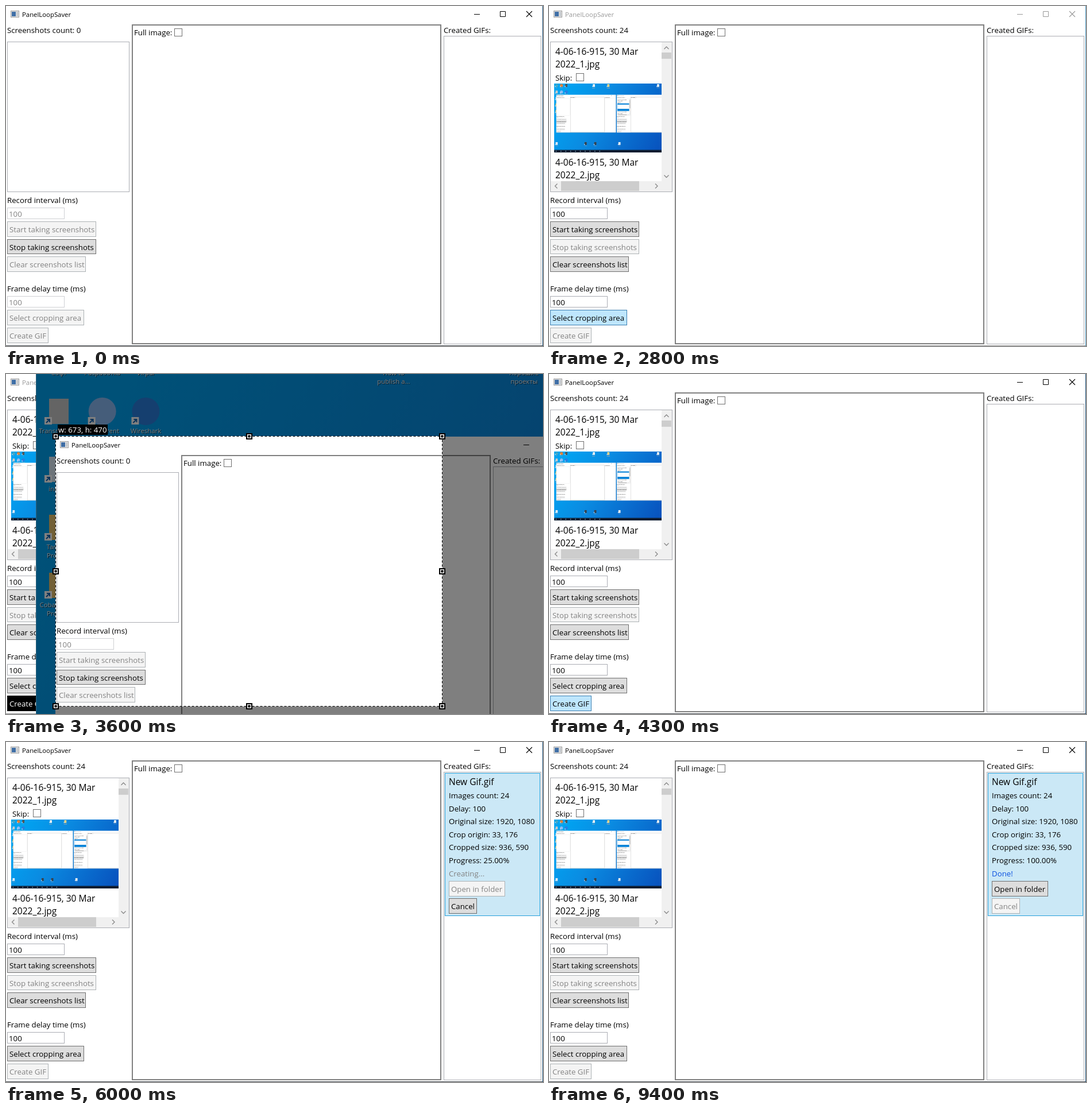
These frames come from a looping animation (935 px wide and 592 px high, 9.9 s). An HTML page:

```html
<!DOCTYPE html>
<html lang="en">
<head>
<meta charset="utf-8">
<title>Screen recorder demo</title>
<style>
html, body { margin: 0; width: 100%; height: 100%; overflow: hidden; background: #fff; }
svg { display: block; }
text { font-family: "Open Sans", "Noto Sans", sans-serif; white-space: pre; }
</style>
</head>
<body>
<svg id="stage" width="935" height="592" viewBox="0 0 935 592">
  <defs id="defs"></defs>
  <g id="view"></g>
</svg>
<script>
const LOOP = 9900, APP = 'PanelLoopSaver', UI = 13.25, BIG = 15.5, SMALL = 11.35;

// Filled box; a stroke is kept inside the given size.
function box(x, y, w, h, fill, stroke, sw = 1) {
  return stroke
    ? `<rect x="${x + sw / 2}" y="${y + sw / 2}" width="${w - sw}" height="${h - sw}" fill="${fill}" stroke="${stroke}" stroke-width="${sw}"/>`
    : `<rect x="${x}" y="${y}" width="${w}" height="${h}" fill="${fill}"/>`;
}
const text = (x, y, s, size = UI, fill = '#000', anchor = 'start') =>
  `<text x="${x}" y="${y}" font-size="${size}" fill="${fill}" text-anchor="${anchor}">${s}</text>`;
const line = (d, color, w = 1) => `<path d="${d}" fill="none" stroke="${color}" stroke-width="${w}"/>`;
const shape = (d, color) => `<path d="${d}" fill="${color}"/>`;
const circle = (x, y, r, color) => `<circle cx="${x}" cy="${y}" r="${r}" fill="${color}"/>`;
const at = (x, y, body, scale = 1) => `<g transform="translate(${x} ${y}) scale(${scale})">${body}</g>`;
const crop = (x, y, w, h, body) =>
  `<svg x="${x}" y="${y}" width="${w}" height="${h}" viewBox="${x} ${y} ${w} ${h}">${body}</svg>`;
function chevron(x, y, dir, color, r = 4, w = 1.3) {
  const turn = { up: 0, right: 90, down: 180, left: 270 }[dir];
  return `<path transform="translate(${x} ${y}) rotate(${turn})" d="M${-r} ${r / 2}L0 ${-r / 2}L${r} ${r / 2}" fill="none" stroke="${color}" stroke-width="${w}"/>`;
}

// ---- recorder window ----
const BUTTON = {
  on: ['#ddd', '#707070', '#000'],
  off: ['#f4f4f4', '#adb2b5', '#838383'],
  hover: ['#bee6fd', '#3c7fb1', '#000'],
  dark: ['#000', '#000', '#fff']
};
function button(x, y, w, label, state, h = 27) {
  const [fill, stroke, ink] = BUTTON[state];
  return box(x, y, w, h, fill, stroke) + text(x + 4, y + 19, label, UI, ink);
}
const input = (y, on) =>
  box(2, y, 100, 20, '#fff', on ? '#abadb3' : '#cfd0d3') + text(5, y + 16, '100', UI, on ? '#000' : '#838383');
const checkbox = (x, y) => box(x, y, 14, 14, '#fff', '#707070');

function shotItem(y, n, thumb) {
  return text(11, y + 22, '4-06-16-915, 30 Mar', BIG) + text(11, y + 44, `2022_${n}.jpg`, BIG) +
    text(11, y + 67, 'Skip:') + checkbox(47, y + 54) + at(9, y + 72, thumb, 1 / 9);
}

function shotList(count, thumb) {
  let out = box(2, 62, 213, 262, '#fff', '#abadb3');
  if (!count) return out;
  const tall = count > 1, right = tall ? 196 : 214;
  let items = shotItem(63, 1, thumb);
  if (tall) items += shotItem(256, 2, '');
  out += crop(3, 63, right - 3, 242, items) + box(3, 305, 211, 18, '#f0f0f0') +
    box(21, 305, tall ? 136 : 160, 17, '#cdcdcd') +
    chevron(12.5, 313.5, 'left', '#888') + chevron(right - 9, 313.5, 'right', '#888');
  if (tall) {
    out += box(196, 63, 18, 242, '#f0f0f0') + box(196, 81, 17, 208 * 242 / (193 * count), '#cdcdcd') +
      chevron(204.5, 73, 'up', '#888') + chevron(204.5, 296.5, 'down', '#888');
  }
  return out;
}

function gifItem(n) {
  const done = n === 24;
  const rows = ['Images count: 24', 'Delay: 100', 'Original size: 1920, 1080', 'Crop origin: 33, 176',
    'Cropped size: 936, 590', `Progress: ${(n / 24 * 100).toFixed(2)}%`];
  return box(764, 54, 166, 249, '#cbe8f6', '#26a0da') + text(771, 75, 'New Gif.gif', BIG) +
    rows.map((s, i) => text(771, Math.round(98 + i * 22.6), s)).join('') +
    text(771, 234, done ? 'Done!' : 'Creating...', UI, done ? '#0a50e0' : '#838383') +
    button(771, 242, 98, 'Open in folder', done ? 'on' : 'off') +
    button(771, 272, 49, 'Cancel', done ? 'off' : 'on');
}

function appIcon() {
  return box(8, 8, 15, 12, '#e8e8e8', '#9a9a9a') + box(10, 10, 7, 8, '#3f6ea5') + box(18, 10, 3, 8, '#c4c8cc');
}

function app(s) {
  const ink = s.active ? '#000' : '#999';
  const idle = s.live ? 'off' : 'on';
  const state = (name, base) => s.hover === name ? 'hover' : base;
  return box(0, 0, 935, 592, '#fff') + appIcon() + text(28, 19, APP, SMALL, ink) +
    line('M815 14.5h10M860.5 9.5h9v9h-9z', ink) + line('M906 9l10 10M916 9l-10 10', ink, 1.1) +
    text(2, 47, `Screenshots count: ${s.count}`) + shotList(s.count, s.thumb) +
    text(2, 343, 'Record interval (ms)') + input(351, !s.live) +
    button(2, 375, 155, 'Start taking screenshots', idle) +
    button(2, 406, 155, 'Stop taking screenshots', s.live ? state('stop', 'on') : 'off', 26) +
    button(2, 436, 137, 'Clear screenshots list', idle) +
    text(2, 497, 'Frame delay time (ms)') + input(505, !s.live) +
    button(2, 529, 134, 'Select cropping area', state('select', idle)) +
    button(2, 560, 72, 'Create GIF', s.create || 'off') +
    box(219, 32, 539, 557, '#fff', '#808080', 2) + text(223, 51, 'Full image:') + checkbox(293, 39) +
    text(762, 47, 'Created GIFs:') + box(762, 52, 170, 537, '#fff', '#abadb3') +
    (s.gif ? gifItem(s.gif) : '') +
    box(0, 591, 935, 1, s.active ? '#3a3f45' : '#8c8c8c') + box(934, 0, 1, 592, s.active ? '#1b4f78' : '#4f9bc4');
}

// ---- desktop, 1920 by 1080 ----
function deskIcon(col, row, label, color, round) {
  const x = 39 + col * 75.7, y = 31 + row * 101;
  const name = (s, i, dx, ink) => text(x + dx, y + 38 + dx + i * 15, s, SMALL, ink, 'middle');
  return (round ? circle(x, y, 24, color) : box(x - 17, y - 22, 34, 44, color)) +
    box(x - 25, y + 10, 13, 13, '#fff') + line(`M${x - 22} ${y + 20}l6 -6m-5 0h5v5`, '#1464b4', 2) +
    label.split('|').map((s, i) => name(s, i, 1, '#02304f') + name(s, i, 0, '#fff')).join('');
}
function desktop() {
  const icons = [
    [0, 0, 'Софт', '#3fa7c8', 1], [1, 0, 'Разработка', '#e0813a', 1], [2, 0, 'Игры', '#555'],
    [7.7, 0, 'How to|publish a...', '#e9eef2'], [10.7, 0, 'Хорошие|проекты', '#f2d487'],
    [21, 0, 'Заметки', '#e9eef2'],
    [0, 1, 'Transmission', '#c9c9c9'], [1, 1, 'qBittorrent', '#8cbcf5', 1], [2, 1, 'Wireshark', '#2a7fe0', 1],
    [0, 2, 'inkdab', '#dce9f5'], [0, 3, 'Tarnbox|Projects', '#e6c26c'], [0, 4, 'Cobalt Forge|Projects', '#e6c26c'],
    [0, 9, 'Корзина', '#dce9f5'], [6, 9, 'Архив', '#36424f'], [8, 9, 'Снимки', '#36424f'], [13, 9, 'Текст', '#e9eef2']
  ];
  const small = box(0, 0, 1920, 1080, '#0a84d8') + box(33, 176, 1884, 590, '#fff');
  let bar = box(0, 1040, 1920, 40, '#0c1c30');
  for (let i = 0; i < 10; i++) bar += circle(30 + i * 76, 1060, 8, '#8fa4b8');
  return box(0, 0, 1920, 1080, 'url(#sky)') + icons.map(i => deskIcon(...i)).join('') + bar +
    at(33, 176, app({ count: 0, live: true, active: true })) +
    at(981, 176, app({ count: 2, live: true, thumb: small }));
}

// ---- crop overlay ----
function overlay(w, h) {
  const x = 86, y = 108;
  let out = at(53, -67, '<use href="#desk"/>');
  const hole = w ? `M${x + .5} ${y + .5}h${w}v${h}h${-w}z` : '';
  out += `<path d="M53 0H935V592H53z${hole}" fill="#000" fill-opacity=".5" fill-rule="evenodd"/>`;
  if (w) {
    out += line(hole, '#fff') + `<path d="${hole}" fill="none" stroke="#000" stroke-dasharray="4 3"/>` +
      box(90, 88, 87, 18, '#000') + text(91, 102, `w: ${w}, h: ${h}`, UI, '#fff');
    for (const i of [0, .5, 1]) for (const j of [0, .5, 1]) {
      if (i === .5 && j === .5) continue;
      const hx = Math.round(x + w * i), hy = Math.round(y + h * j);
      out += box(hx - 5, hy - 5, 11, 11, '#000') + box(hx - 3, hy - 3, 7, 7, '#000', '#fff', 1.4);
    }
  }
  return crop(53, 0, 882, 592, out) + box(52, 0, 1, 592, '#35647c');
}

// ---- save dialog ----
const FILES = [
  ['ASPdotNETCore Roadmap', '19.01.2022 2:58'], ['ambervale', '29.03.2022 2:15'],
  ['SharedFolder', '14.09.2021 16:01'], ['VMShared', '31.01.2022 10:48'],
  ['Игры', '22.03.2022 17:57'], ['Разработка', '24.03.2022 1:58'], ['Софт', '02.02.2022 12:05'],
  ['типа диплом', '27.12.2021 20:42'], ['Фракталы (соединить в 1 приложение)', '23.03.2022 17:55'],
  ['Хорошие проекты', '27.03.2022 20:27'], ['New 2Gif.gif', '30.03.2022 2:43', 'Файл "GIF"', '5 362 КБ'],
  ['_My Programs', '10.02.2022 15:53', 'Ярлык', '1 КБ'], ['Tarnbox Projects', '21.03.2022 17:22', 'Ярлык', '2 КБ'],
  ['Cobalt Forge Projects', '18.06.2021 18:29', 'Ярлык', '2 КБ']
];
const PLACES = ['Изображени', 'Этот компьютер', 'Видео', 'Документы', 'Загрузки', 'Изображения', 'Музыка',
  'Рабочий стол', 'Локальный дис', 'Data_2 (D:)', 'Data (E:)', 'Локальный дис', ''];

function fileIcon(i, y) {
  if (i === 4) return `<rect x="187" y="${y - 5}" width="14" height="8" rx="4" fill="#777"/>` + circle(191, y - 1, 1.5, '#222') + circle(197, y - 1, 1.5, '#222');
  if (i === 5) return circle(194, y, 7.5, '#e07a25') + circle(194, y, 3.5, '#fff');
  if (i === 6) return circle(194, y, 7.5, '#4fa9c2') + circle(194, y, 4.5, '#e4f3f7');
  if (i === 10) return box(188, y - 8, 12, 15, '#fff') + box(190, y - 3, 8, 6, '#2f78c4');
  return box(188, y - 8, 12, 15, '#f6d675') + box(196, y - 7, 5, 14, '#ffe79c') +
    (i > 10 ? box(186, y, 8, 8, '#fff') + line(`M188 ${y + 6}l4 -4m-3 0h3v3`, '#1464b4') : '');
}

function placeIcon(i, y) {
  if (i === 1 || i === 7) return box(i === 1 ? 32 : 40, y - 6, 16, 11, '#2797ee') + (i === 1 ? box(36, y + 6, 8, 2, '#9fd4f7') : '');
  if (i === 0 || i === 5) return box(40, y - 5, 16, 11, '#3c9ade', '#eee') + shape(`M42 ${y + 4}l4 -5l3 3l2 -2l3 4z`, '#e8f4ea');
  if (i === 2) return box(41, y - 7, 13, 14, '#6f7780') + box(44, y - 5, 7, 10, '#3187c9') + line(`M42.5 ${y - 6}v12M52.5 ${y - 6}v12`, '#111');
  if (i === 3) return box(42, y - 7, 12, 14, '#fff') + line(`M44 ${y - 3.5}h8m-8 3h8m-8 3h8`, '#3b82b8');
  if (i === 4) return shape(`M45 ${y - 7}h6v6h4l-7 8l-7 -8h4z`, '#2d98f0');
  if (i === 6) return circle(45, y + 4, 3, '#3aa0f0') + line(`M47.5 ${y + 4}v-11q1 4 5 6`, '#3aa0f0', 1.8);
  if (i === 12) return circle(42, y + 4, 6, '#5db0e0');
  return `<rect x="41" y="${y}" width="14" height="6" rx="1" fill="#d2d5d8"/>` + box(43, y + 3, 3, 1, '#444') +
    (i === 8 ? box(40, y - 5, 5, 4, '#2797ee') : '');
}

function dialog(filled) {
  const label = (x, y, s, size = SMALL, c = '#fff', a) => text(x, y + 4, s, size, c, a);
  let out = box(7, 29, 930, 534, '#4a4a4a') + box(8, 30, 927, 532, '#202020') + box(8, 30, 927, 31, '#000') +
    label(16, 46, 'Сохранение') + line('M932 41l7 8M932 49l7 -8', '#fff') + box(8, 61, 927, 42, '#191919');
  // address row
  out += line('M33 81.5H22m5 -5l-5 5l5 5M51 81.5h11m-5 -5l5 5l-5 5', '#aaa', 1.4) + chevron(80, 81, 'down', '#aaa', 3) +
    line('M101 88V76m-5 5l5 -5l5 5', '#fff', 1.7) + box(114, 66, 612, 30, '#191919', '#535353') +
    line('M692.5 67v28', '#2b2b2b') + box(117, 74, 16, 11, '#2797ee') +
    chevron(143, 81, 'right', '#aaa', 3) + label(153, 81, 'Этот компьютер') + chevron(256, 81, 'right', '#aaa', 3) +
    label(267, 81, 'Рабочий стол') + chevron(354, 81, 'right', '#aaa', 3) + chevron(677, 82, 'down', '#aaa', 4) +
    line('M706.5 78.5a4.5 4.5 0 1 0 6 -.5M709 76h4.5v4.5', '#aaa', 1.3) + box(738, 66, 210, 30, '#191919', '#535353') +
    label(747, 81, 'Поиск: Рабочий стол', SMALL, '#8c8c8c') + line('M924 83l-4 4', '#bbb', 1.5) +
    '<circle cx="926.5" cy="80" r="4" fill="none" stroke="#bbb" stroke-width="1.3"/>';
  // command row
  out += label(26, 118, 'Упорядочить') + shape('M103 116h8l-4 4z', '#ccc') + label(142, 118, 'Новая папка') +
    box(859, 112, 4, 12, '#bbb') + line('M865 113.5h9m-9 4h9m-9 4h9', '#aaa', 1.4) + shape('M883 116h8l-4 4z', '#ccc') +
    circle(929, 118, 7, '#1f7fd0') + text(929, 122, '?', 11, '#fff', 'middle');
  // places
  let places = box(8, 133, 157, 312, '#191919') + box(8, 311, 138, 22, '#333');
  PLACES.forEach((s, i) => {
    const y = i ? 154 + i * 24 : 146;
    places += placeIcon(i, y) + label(i === 1 ? 52 : 61, y, s);
  });
  places += box(148, 218, 15, 190, '#4d4d4d') + chevron(155.5, 143.5, 'up', '#888', 3.5) + chevron(155.5, 437, 'down', '#888', 3.5) +
    line('M136 151l3 -3m-2 -3l4 4m-2 -5l4 4m-5 -1l3 -3', '#999', 1.5);
  // files
  let files = line('M439.5 134v25M583.5 134v25M703.5 134v25M783.5 134v25', '#5a5a5a') + chevron(643, 136.5, 'up', '#999', 3.5, 1);
  [[185, 'Имя'], [446, 'Дата изменения'], [590, 'Тип'], [710, 'Размер']].forEach(([x, s]) => files += label(x, 147, s));
  if (filled) FILES.forEach(([name, date, kind = 'Папка с файлами', size = ''], i) => {
    const y = 176 + i * 21;
    files += fileIcon(i, y) + label(206, y, name) + label(446, y, date, 10.7) +
      label(590, y, kind) + label(776, y, size, 10.9, '#fff', 'end');
  });
  out += crop(8, 133, 927, 312, places + files);
  // footer
  out += box(8, 445, 927, 117, '#383838') + label(128, 467, 'Имя файла:', SMALL, '#fff', 'end') +
    box(133, 456, 820, 23, '#383838', '#dcdcdc') + label(139, 467, 'New Gif.gif') +
    label(128, 492, 'Тип файла:', SMALL, '#fff', 'end') + box(133, 482, 820, 22, '#383838', '#8a8a8a') + label(137, 492, '.gif (*.gif)') +
    chevron(937, 467, 'down', '#ccc', 3) + chevron(937, 493, 'down', '#ccc', 3) +
    chevron(26, 540, 'up', '#ddd', 4) + label(38, 540, 'Скрыть папки') +
    box(736, 524, 99, 26, '#595959', '#fff', 1.5) + label(785.5, 537, 'Сохранить', SMALL, '#fff', 'middle') +
    box(847, 524, 88, 26, '#333', '#e0e0e0', 1.5) + label(891, 537, 'Отмена', SMALL, '#fff', 'middle');
  return box(4, 29, 3, 538, 'rgba(0,0,0,.1)') + box(7, 563, 928, 4, 'rgba(0,0,0,.14)') + out;
}

// ---- timeline ----
function encoded(t) {
  if (t < 5200) return 0;
  if (t < 5300) return 1;
  if (t < 5400) return 2;
  if (t < 7500) return 3 + Math.floor((t - 5400) / 200);
  if (t < 9400) return 14 + Math.floor((t - 7500) / 200);
  return 24;
}
function hovered(t) {
  if (t >= 2400 && t < 2600) return 'stop';
  if (t >= 2700 && t < 2900) return 'select';
}
function createState(t) {
  if (t >= 3400 && t < 4200) return 'dark';
  if (t >= 4200 && t < 4300) return 'on';
  return t >= 4300 && t < 4500 ? 'hover' : 'off';
}
function scene(t) {
  let out = app({
    count: Math.max(0, Math.min(24, Math.floor(t / 100) - 1)),
    live: t < 2600,
    active: t < 2800 || (t >= 4200 && t < 4500) || t >= 5300,
    hover: hovered(t),
    create: createState(t),
    gif: encoded(t),
    thumb: '<use href="#desk"/>'
  });
  if (t >= 2900 && t < 4200) {
    const left = 1 - Math.max(0, Math.min(1, (t - 3300) / 600));
    out += overlay(Math.round(936 * (1 - left ** 1.832)), Math.round(590 * (1 - left ** 2.3)));
  }
  if (t >= 4500 && t < 5200) out += dialog(t >= 4600);
  return out;
}

document.getElementById('defs').innerHTML =
  '<linearGradient id="sky" x1="0" y1=".3" x2="1" y2=".6"><stop offset="0" stop-color="#00a4f2"/>' +
  '<stop offset=".35" stop-color="#0a8ce2"/><stop offset="1" stop-color="#0850bc"/></linearGradient>' +
  `<g id="desk">${desktop()}</g>`;
const view = document.getElementById('view');
const start = performance.now();
let shown = -1;
function tick() {
  const t = Math.floor((performance.now() - start) % LOOP / 100) * 100;
  if (t !== shown) view.innerHTML = scene(shown = t);
  requestAnimationFrame(tick);
}
tick();
</script>
</body>
</html>
```
